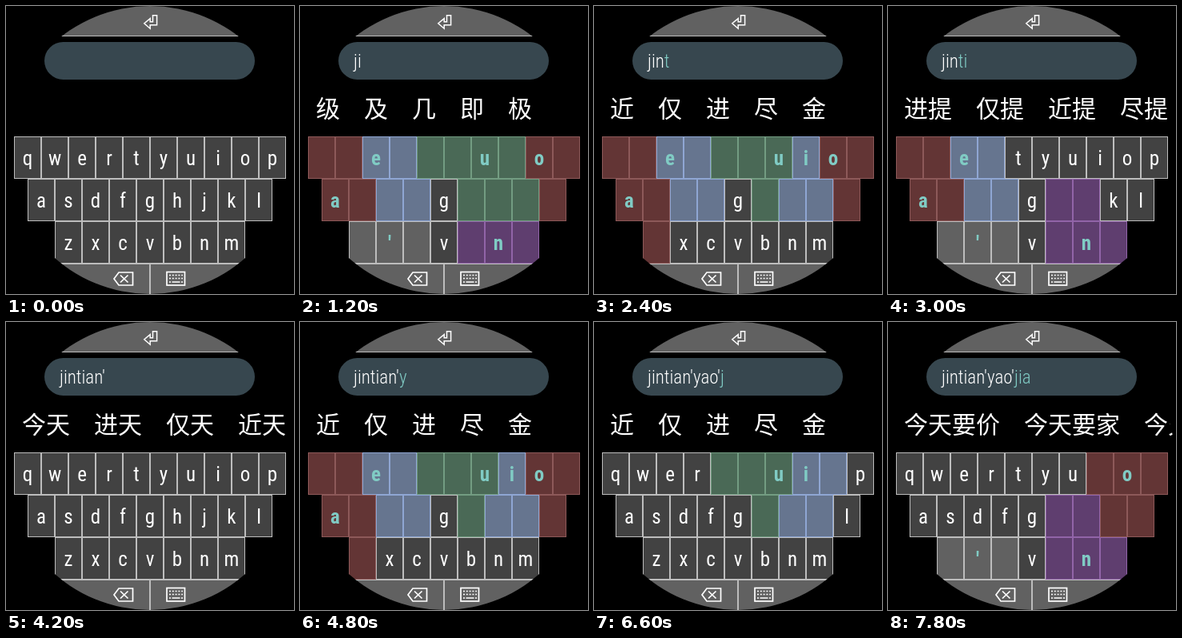
An HTML page that plays this animation: 360 by 360 pixels, repeating every 8000 ms.

```html
<!DOCTYPE html>
<html lang="en">
<head>
<meta charset="utf-8">
<title>Round keyboard</title>
<style>
  html, body { margin: 0; width: 100%; height: 100%; overflow: hidden; background: #000; }
  svg { display: block; width: 100vw; height: 100vh; }
  text { fill: #fff; white-space: pre; }
  .latin { font-family: "Roboto Condensed", Roboto, sans-serif; font-stretch: 75%; }
  .key { font-size: 25px; text-anchor: middle; }
  .entry { font-size: 23px; font-weight: 300; }
  .word { font: 500 30px "Noto Sans CJK SC", "Noto Sans CJK", sans-serif; }
  .teal { fill: #80cbc4; }
  .icon { fill: none; stroke: #fff; stroke-width: 1.7; }
</style>
</head>
<body>
<svg viewBox="0 0 360 360">
  <clipPath id="face"><circle cx="180" cy="180" r="180"/></clipPath>
  <g clip-path="url(#face)">
    <path d="M0 0H360V38H0Z" fill="#616161"/>
    <path d="M0 37.5H360" stroke="#bdbdbd"/>
    <rect x="48" y="45" width="263" height="47" rx="23.5" fill="#37474f"/>
    <text class="latin entry" x="67" y="77"><tspan id="done"></tspan><tspan id="open" class="teal"></tspan></text>
    <g id="words"></g>
    <path d="M0 322H360V360H0Z" fill="#616161"/>
    <path d="M0 322.5H360" stroke="#bdbdbd"/>
    <path d="M180 322V360" stroke="#bdbdbd" stroke-width="2"/>
    <g id="keys"></g>
    <path class="icon" style="stroke-width:1.5" d="M183.5 11.8H188.6V23.8H180.2V28.2L172.8 21.8L180.2 15.6V19.8H183.5Z"/>
    <path class="icon" d="M141 333H158.5V349H141L135 341ZM143 336.5L152.500 345.500M152.500 336.500L143 345.500"/>
    <rect class="icon" x="201" y="332.500" width="22.500" height="16.500"/>
    <path class="icon" stroke-dasharray="2 1.800" d="M204 336.500H221M204 340.500H221"/>
    <path class="icon" d="M204 345H206M207.500 345H217.500M219 345H221"/>
  </g>
</svg>
<script>
const LOOP = 8000, STEP = 600;
const $ = id => document.getElementById(id);
const RED = ['#633535', '#8d5959'], BLUE = ['#66758f', '#8fa6d3'];
const GREEN = ['#4a6956', '#739c82'], PURPLE = ['#5f3e6f', '#9164a8'];
const GRAY = ['#616161', '#bdbdbd'], PLAIN = ['#424242', '#bdbdbd'];
const COLORS = { a: RED, o: RED, e: BLUE, i: BLUE, g: BLUE, u: GREEN, n: PURPLE, "'": GRAY };

// Each group: predicted letter, then the keys it takes over.
const VOWELS = 'a:qwasz e:erdf u:tyuh i:ijk o:opl';
const AFTER_J = 'u:tyuh i:iojk';
const AFTER_JI = "a:qwas e:erdf u:tyuihjk o:opl n:bnm ':zxc";
const NASAL = 'o:iopkl n:hjbnm';
const JIN = '近 仅 进 尽 金';

// Finished text, open syllable, candidate words, key groups.
const states = [
  ['', '', '', ''],
  ['j', '', '', AFTER_J],
  ['ji', '', '级 及 几 即 极', AFTER_JI],
  ['jin', '', JIN, "g:fghvb ':zxc"],
  ['jin', 't', JIN, VOWELS],
  ['jin', 'ti', '进提 仅提 近提 尽提', "a:qwas e:erdf n:hjbnm ':zxc"],
  ['jin', 'tia', JIN, NASAL],
  ["jintian'", '', '今天 进天 仅天 近天', ''],
  ["jintian'", 'y', JIN, VOWELS],
  ["jintian'", 'ya', '今天呀 今天压 今天亚', NASAL + " ':zxc"],
  ["jintian'yao'", '', '今天要 今天药 今天咬', ''],
  ["jintian'yao'", 'j', JIN, AFTER_J],
  ["jintian'yao'", 'ji', '今天要级 今天要及 今天要几', AFTER_JI],
  ["jintian'yao'", 'jia', '今天要价 今天要家 今天要加', NASAL + " ':zxc"]
];

function add(parent, tag, attrs) {
  const el = document.createElementNS('http://www.w3.org/2000/svg', tag);
  for (const name in attrs) el.setAttribute(name, attrs[name]);
  return parent.appendChild(el);
}

const keys = {};
[['qwertyuiop', 10], ['asdfghjkl', 27], ['zxcvbnm', 61]].forEach(([row, left], r) => {
  [...row].forEach((letter, i) => {
    const x = left + 34 * i, y = 163 + 53 * r;
    keys[letter] = {
      box: add($('keys'), 'rect', { x: x + .5, y: y + .5, width: 33, height: 52 }),
      label: add($('keys'), 'text', { class: 'latin key', x: x + 17, y: y + 36 })
    };
  });
});

function paintKey(letter, [fill, stroke], label, hit) {
  const { box, label: text } = keys[letter];
  box.setAttribute('fill', fill);
  box.setAttribute('stroke', stroke);
  text.textContent = label;
  text.setAttribute('class', 'latin key' + (hit ? ' teal' : ''));
  text.setAttribute('font-weight', hit ? 700 : 400);
}

function show([done, open, words, groups]) {
  $('done').textContent = done;
  $('open').textContent = open;
  $('words').textContent = '';
  let x = 20;
  for (const word of words.split(' ')) {
    add($('words'), 'text', { class: 'word', x, y: 139 }).textContent = word;
    x += 30 * word.length + 30;
  }
  for (const letter in keys) paintKey(letter, PLAIN, letter, false);
  for (const group of groups.split(' ').filter(Boolean)) {
    const [hit, members] = group.split(':');
    const home = hit === "'" ? 'x' : hit;
    for (const letter of members) paintKey(letter, COLORS[hit], letter === home ? hit : '', true);
  }
}

let shown = -1;
function draw(now) {
  const step = Math.floor(now % LOOP / STEP);
  if (step !== shown) show(states[shown = step]);
  requestAnimationFrame(() => draw(performance.now() - start));
}
const start = performance.now();
draw(0);
</script>
</body>
</html>
```
